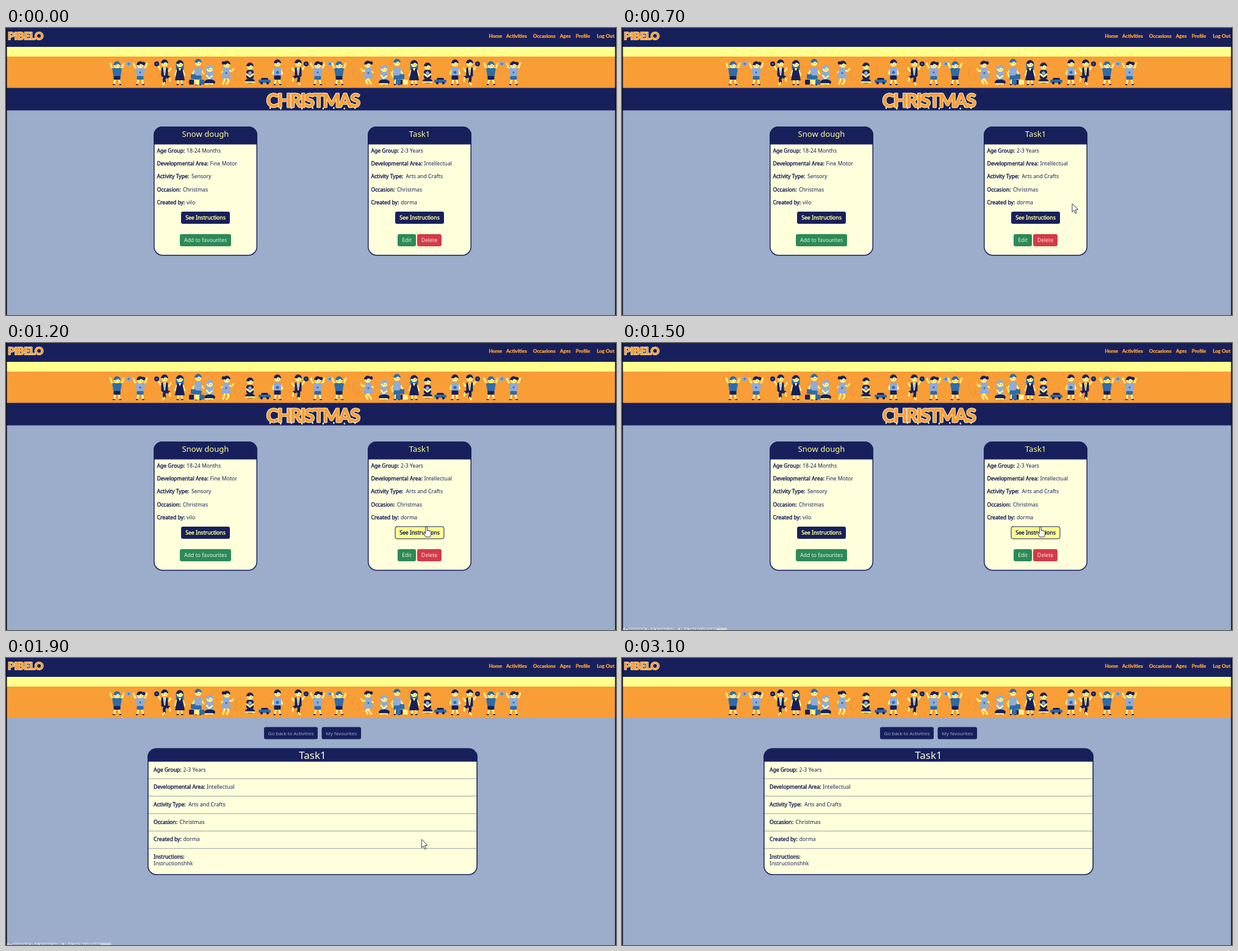
Animation of 1000x472 px, one loop 3.2 s. Source, as an HTML page with a canvas:

```html
<!DOCTYPE html>
<html lang="en">
<head>
<meta charset="utf-8">
<title>Activities</title>
<style>
html, body { margin: 0; width: 100%; height: 100%; overflow: hidden; background: #9badcb; }
canvas { display: block; width: 1000px; height: 472px; }
</style>
</head>
<body>
<canvas id="stage" width="1000" height="472"></canvas>
<script>
const ctx = document.getElementById('stage').getContext('2d');
const LOOP = 3200, STEP = 100;
const SANS = '"Noto Sans", "Open Sans", sans-serif';
const ROUND = 'Lato, "Open Sans", sans-serif';
const NAVY = '#18205c', ORANGE = '#f99d36', YELLOW = '#ffff8e', CREAM = '#ffffdc';
const SKY = '#9badcb', BLUE = '#2d6cab', PALE = '#8fabd9', SKIN = '#fff58c', FROST = '#fff6cf';

// ---- primitives ----
function rect(x, y, w, h, color) {
  ctx.fillStyle = color;
  ctx.fillRect(x, y, w, h);
}
function box(x, y, w, h, r, fill, edge, width = 1) {
  ctx.beginPath();
  ctx.roundRect(x, y, w, h, r);
  ctx.fillStyle = fill;
  ctx.fill();
  if (edge) {
    ctx.strokeStyle = edge;
    ctx.lineWidth = width;
    ctx.stroke();
  }
}
function disc(x, y, r, color, ry = r, from = 0, to = 7) {
  ctx.beginPath();
  ctx.ellipse(x, y, r, ry, 0, from, to);
  ctx.fillStyle = color;
  ctx.fill();
}
function trace(pts) {
  ctx.beginPath();
  for (let i = 0; i < pts.length; i += 2) ctx.lineTo(pts[i], pts[i + 1]);
}
function line(color, width, ...pts) {
  trace(pts);
  ctx.strokeStyle = color;
  ctx.lineWidth = width;
  ctx.stroke();
}
function shape(color, ...pts) {
  trace(pts);
  ctx.fillStyle = color;
  ctx.fill();
}
function text(str, x, y, size, color, { bold = 0, align = 'left', font = SANS, weight = 400 } = {}) {
  ctx.font = `${weight} ${size}px ${font}`;
  ctx.textAlign = align;
  ctx.fillStyle = color;
  ctx.fillText(str, x, y);
  if (bold) {
    ctx.strokeStyle = color;
    ctx.lineWidth = bold;
    ctx.strokeText(str, x, y);
  }
}
function frosted(str, x, y, size, spacing, rim) {
  ctx.letterSpacing = spacing + 'px';
  text(str, x, y, size, FROST, { bold: rim, font: ROUND, weight: 700 });
  text(str, x, y, size, ORANGE, { bold: rim * 0.3, font: ROUND, weight: 700 });
  ctx.letterSpacing = '0px';
}

// ---- children on the banner ----
function head(x, y, hair, tail = 0) {
  if (tail) disc(x + tail * 5.5, y - 2.5, 2.8, hair);
  disc(x, y, 5.4, SKIN, 5.2);
  disc(x, y - 0.6, 5.8, hair, 5.6, Math.PI * 0.96, Math.PI * 2.04);
  disc(x + 1.4, y - 0.2, 2.6, SKIN, 1.6);
  disc(x - 1.8, y + 1.2, 0.55, NAVY);
  disc(x + 2, y + 1.2, 0.55, NAVY);
}
function legs(x, spread, top, color) {
  for (const s of [-1, 1]) {
    line(SKIN, 3, x + s * 2.5, top, x + s * spread, 91);
    line(color, 2.2, x + s * spread, 93, x + s * (spread + 1.5), 93);
  }
}
function ball(x, y, color = PALE) {
  disc(x, y, 4, color);
  disc(x, y, 1.6, BLUE);
}
function cheer(x, shirt, pants, ballX) {
  for (const s of [-1, 1]) line(SKIN, 2.6, x + s * 4, 69, x + s * 9, 64, x + s * 11, 58);
  legs(x, 4.5, 82, NAVY);
  shape(shirt, x - 8, 66, x + 8, 66, x + 5.5, 81, x - 5.5, 81);
  box(x - 5.5, 79, 11, 6, 1.5, pants);
  head(x, 61, pants === NAVY ? BLUE : NAVY, shirt === PALE ? 1 : 0);
  if (shirt === PALE) disc(x, 73, 1.6, BLUE);
  if (ballX) ball(ballX, 59);
}
function dancer(x, dir) {
  line(SKIN, 2.6, x, 68, x - dir * 7, 71, x - dir * 10, 66);
  line(SKIN, 2.6, x, 68, x + dir * 7, 68, x + dir * 10, 63);
  line(NAVY, 4.4, x + 1, 79, x + dir, 85, x, 89);
  line(NAVY, 4.4, x - 1, 79, x - dir * 7, 81);
  line(SKIN, 2.6, x - dir * 8, 82, x - dir * 9, 87);
  line(SKIN, 2.6, x, 90, x + dir * 3, 93);
  box(x - 5.5, 65, 11, 15, 2, NAVY);
  shape(SKIN, x - 2.5, 65, x + 2.5, 65, x + 1, 78, x - 1, 78);
  line(PALE, 1.4, x, 67, x, 77);
  head(x, 58, NAVY);
  ball(x + dir * 13, 59, NAVY);
}
function dress(x) {
  box(x - 6.5, 54, 13, 17, 5, BLUE);
  legs(x, 3, 84, NAVY);
  line(SKIN, 2.4, x - 5, 70, x - 8, 78);
  line(SKIN, 2.4, x + 5, 70, x + 8, 78);
  shape(NAVY, x - 4, 66, x + 4, 66, x + 8, 86, x - 8, 86);
  shape(SKIN, x - 2.5, 66, x + 2.5, 66, x, 71);
  head(x, 59, NAVY);
}
function builder(x, dir) {
  line(SKIN, 2.6, x - 4, 68, x - 9, 74, x - 7, 80);
  line(SKIN, 2.6, x + 4, 68, x + 9, 75);
  box(x - 6, 64, 12, 17, 3, PALE);
  box(x - 5.5, 78, 11, 8, 2, BLUE);
  legs(x, 3, 86, NAVY);
  head(x, 57, BLUE);
  const px = x - dir * 8;
  box(px - 4, 76, 8, 8, 1, BLUE);
  box(px - 7, 85, 8, 8, 1, NAVY);
  box(px + 2, 85, 8, 8, 1, SKIN);
  box(px + 10 * dir, 85, 8, 8, 1, BLUE);
}
function kneeler(x) {
  box(x - 6.5, 62, 13, 13, 5, PALE);
  box(x - 6, 73, 12, 14, 4, PALE);
  line(SKIN, 2.6, x - 5, 78, x - 1, 83, x + 4, 79);
  disc(x, 89, 9, NAVY, 4.5);
  line(SKIN, 2.4, x - 7, 92, x + 5, 92);
  head(x, 67, PALE);
}
function skipper(x, dir) {
  line(SKIN, 2.6, x, 69, x + dir * 9, 71, x + dir * 12, 67);
  line(SKIN, 2.6, x, 69, x - dir * 8, 73);
  line(SKIN, 2.8, x - 2, 82, x - dir * 5, 92);
  line(SKIN, 2.8, x + 2, 82, x + dir * 4, 87, x + dir, 92);
  shape(PALE, x - 4, 65, x + 4, 65, x + 8, 83, x - 8, 83);
  disc(x, 74, 1.6, BLUE);
  head(x + dir, 60, NAVY, -dir);
  ctx.strokeStyle = '#c99448';
  ctx.lineWidth = 0.7;
  ctx.beginPath();
  ctx.ellipse(x + dir * 20, 76, 5, 11, dir * 0.35, 0, 5.2);
  ctx.stroke();
}
function sitter(x) {
  box(x - 6, 69, 12, 15, 4, NAVY);
  line(SKIN, 3, x - 5, 76, x, 80, x + 5, 76);
  disc(x, 74, 2.8, PALE);
  disc(x, 87, 8, NAVY, 4);
  line(SKIN, 2.6, x - 7, 89, x + 7, 89);
  head(x, 63, NAVY);
}
function car(x) {
  box(x - 6, 82, 12, 5, 2.5, NAVY);
  box(x - 10, 85, 20, 5, 2, BLUE);
  disc(x - 5, 90.5, 2.2, NAVY);
  disc(x + 5, 90.5, 2.2, NAVY);
}
function reader(x) {
  legs(x, 4, 83, NAVY);
  line(SKIN, 2.6, x - 5, 68, x - 8, 75, x - 1, 77);
  line(SKIN, 2.6, x + 5, 68, x + 8, 75, x + 1, 77);
  box(x - 6, 65, 12, 15, 3, PALE);
  box(x - 5.5, 78, 11, 7, 1.5, NAVY);
  disc(x, 73, 2.5, BLUE);
  head(x, 58, NAVY);
}
function banner() {
  cheer(182, BLUE, NAVY, 201); cheer(220, PALE, BLUE);
  dancer(260, -1); dress(285); builder(315, 1); kneeler(334); skipper(361, 1);
  sitter(400); car(424); reader(445); dancer(479, 1);
  cheer(511, PALE, BLUE, 531); cheer(546, BLUE, NAVY);
  skipper(594, -1); kneeler(620); builder(641, -1); dress(669);
  sitter(691); car(712); reader(736); dancer(760, 1);
  cheer(795, BLUE, NAVY, 813); cheer(832, PALE, BLUE);
}

// ---- page parts ----
function button(x, y, w, label, fill, color, { size = 8.7, bold = 0, edge } = {}) {
  box(x, y, w, 20, 3, fill, edge);
  text(label, x + w / 2, y + 13, size, color, { bold, align: 'center' });
}
function field(x, y, label, value, valueX, valueY = y) {
  text(label, x, y, 8.6, NAVY, { bold: 0.4 });
  text(value, valueX, valueY, 8.7, NAVY);
}
function frame() {
  rect(0, 0, 1000, 472, SKY);
  rect(0, 0, 1000, 31, NAVY);
  rect(0, 31, 1000, 16, YELLOW);
  rect(0, 47, 1000, 51.5, ORANGE);
  banner();
  frosted('PIBELO', 3, 18.5, 17.8, -0.6, 1.8);
  const nav = [['Home', 791.5], ['Activities', 820], ['Occasions', 864], ['Ages', 908], ['Profile', 934], ['Log Out', 968.5]];
  for (const [label, x] of nav) text(label, x, 15.5, 8.1, ORANGE, { bold: 0.4, font: ROUND, weight: 700 });
}
function card(x, title, rows, hover) {
  box(x + 0.75, 162.75, 168.5, 211, 14, CREAM, NAVY, 1.5);
  box(x, 162, 170, 29.5, [14, 14, 0, 0], NAVY);
  text(title, x + 85, 179, 13.1, YELLOW, { align: 'center' });
  rows.forEach(([label, value, dx], i) => field(x + 5.5, 205 + i * 21.2, label, value, x + dx));
  button(x + 45, 302, 80, 'See Instructions', hover ? YELLOW : NAVY, hover ? NAVY : YELLOW,
    { bold: 0.4, edge: hover && NAVY });
}
function listPage(hover) {
  rect(0, 98.5, 1000, 37, NAVY);
  frosted('CHRISTMAS', 427, 129.5, 30, -2.2, 2.8);
  for (let i = 0; i < 9; i++) disc(433 + i * 17.4, 131.5 + i % 2, 1.2, FROST, 1.8);
  card(242, 'Snow dough', [
    ['Age Group:', '18-24 Months', 54], ['Developmental Area:', 'Fine Motor', 92.5],
    ['Activity Type:', 'Sensory', 62], ['Occasion:', 'Christmas', 48], ['Created by:', 'vilo', 54]
  ]);
  button(285, 339, 84, 'Add to favourites', '#2c8a57', '#e3f5e4');
  card(593, 'Task1', [
    ['Age Group:', '2-3 Years', 54], ['Developmental Area:', 'Intellectual', 92.5],
    ['Activity Type:', 'Arts and Crafts', 62.5], ['Occasion:', 'Christmas', 48], ['Created by:', 'dorma', 54]
  ], hover);
  button(642, 339, 30, 'Edit', '#2c8a57', '#e3f5e4');
  button(674, 339, 40, 'Delete', '#d23b48', '#ffe6dc');
}
function detailPage() {
  button(423, 113.5, 88, 'Go back to Activities', NAVY, SKY, { size: 7.9 });
  button(517.5, 113.5, 64.5, 'My favourites', NAVY, SKY, { size: 7.9 });
  box(232.8, 149.4, 539.4, 206.8, 14, CREAM, NAVY, 1.6);
  box(232, 148.6, 541, 21.8, [14, 14, 0, 0], NAVY);
  text('Task1', 502.5, 165.5, 17, CREAM, { align: 'center' });
  const rows = [
    ['Age Group:', '2-3 Years', 290.5], ['Developmental Area:', 'Intellectual', 329],
    ['Activity Type:', 'Arts and Crafts', 299], ['Occasion:', 'Christmas', 284.5], ['Created by:', 'dorma', 290.5]
  ];
  rows.forEach(([label, value, x], i) => {
    const y = 186.5 + i * 28.7;
    field(242, y, label, value, x);
    rect(234, y + 11.3, 537, 1.4, '#b4bab4');
  });
  field(242, 330, 'Instructions:', 'Instructionshhk', 242, 341);
}
function statusBar() {
  rect(0, 468.5, 172, 3.5, '#cdd5e3');
  text('Opening the page with the instructions', 5, 475, 8.2, '#59617c');
}

// ---- pointer: time, x, y ----
const path = [
  [200, 985, 480], [300, 930, 428], [400, 850, 368], [500, 767.5, 304.5], [700, 738, 289],
  [900, 713.5, 281.5], [1100, 694, 295], [1200, 689, 302], [1800, 682.5, 302], [2000, 680, 295],
  [2200, 670, 268], [2400, 665.5, 257.5], [2500, 665.5, 250], [2900, 700, -20]
];
function pointerAt(t) {
  const i = path.findIndex(p => p[0] > t);
  if (i < 1) return null;
  const [t0, x0, y0] = path[i - 1], [t1, x1, y1] = path[i];
  const k = (t - t0) / (t1 - t0);
  return [x0 + (x1 - x0) * k, y0 + (y1 - y0) * k];
}
function outlined(pts) {
  trace(pts);
  ctx.closePath();
  ctx.fillStyle = '#fff';
  ctx.fill();
  ctx.strokeStyle = '#20242e';
  ctx.lineWidth = 0.9;
  ctx.stroke();
}
function pointer([x, y], hand) {
  ctx.save();
  ctx.translate(x, y);
  if (hand) {
    outlined([-1.5, 1, 0, 0, 1.5, 1, 1.5, 6.5, 4, 6.5, 6.5, 7.5, 8, 9, 7.5, 14, 6, 17, -1, 17, -4.5, 11, -4, 9.5, -1.5, 11]);
  } else {
    outlined([0, 0, 0, 13.5, 3, 10.8, 5.2, 16, 7.4, 15, 5.2, 10, 9.3, 9.7]);
  }
  ctx.restore();
}

// ---- playback ----
function draw(t) {
  const hand = t >= 1200 && t < 1700;
  frame();
  if (t < 1900) listPage(hand);
  else detailPage();
  if (t >= 1300 && t < 2000) statusBar();
  rect(0, 0, 1.5, 472, '#0b0e1c');
  rect(998.5, 0, 1.5, 472, '#0b0e1c');
  const spot = pointerAt(t);
  if (spot) pointer(spot, hand);
}
ctx.lineJoin = ctx.lineCap = 'round';
const start = performance.now();
let shown = -1;
function tick() {
  const t = Math.floor((performance.now() - start) % LOOP / STEP) * STEP;
  if (t !== shown) draw(shown = t);
  requestAnimationFrame(tick);
}
tick();
</script>
</body>
</html>
```
